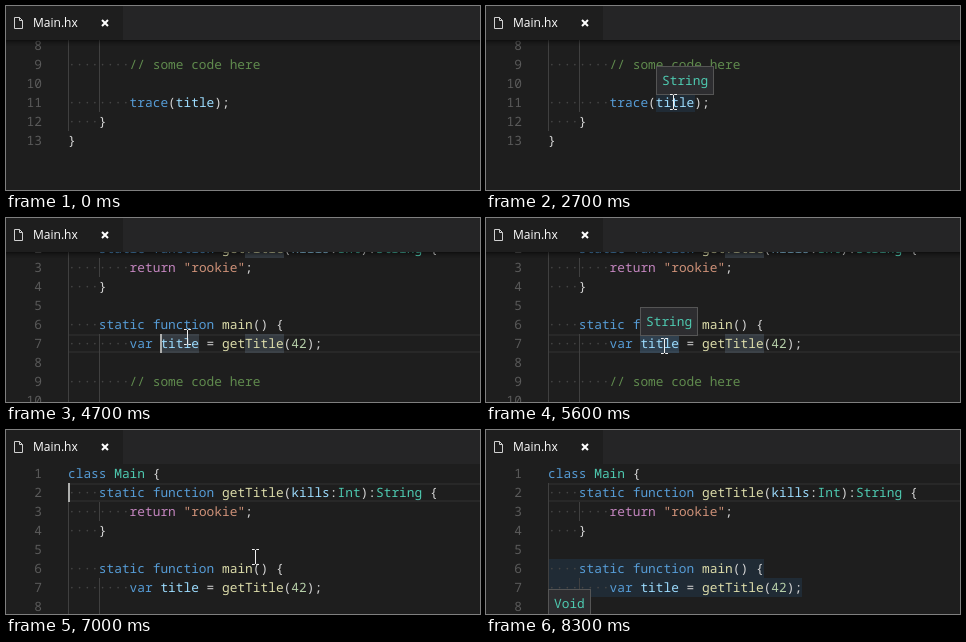
Recreate the animation shown at these times as an HTML page. Size 474 px wide and 184 px high, loop 8400 ms.

```html
<!DOCTYPE html>
<html lang="en">
<head>
<meta charset="utf-8">
<title>Hover and go to definition</title>
<style>
  html, body { margin: 0; width: 100%; height: 100%; overflow: hidden; background: #1e1e1e; }
  #stage { position: relative; width: 474px; height: 184px; overflow: hidden; background: #1e1e1e; }
  #stage div, #stage span, #stage svg { position: absolute; }
  #tabs { left: 0; top: 0; width: 474px; height: 34px; background: #252526; }
  #tab { left: 0; top: 0; width: 117px; height: 34px; background: #1e1e1e; }
  #tab span { left: 27px; top: 0; font: 12px/34px "Open Sans", "Noto Sans", sans-serif; color: #fff; }
  #editor { left: 0; top: 34px; width: 474px; height: 150px; overflow: hidden;
    font: 12.83px/19px "Noto Sans Mono", "DejaVu Sans Mono", monospace;
    text-rendering: geometricPrecision; white-space: pre; color: #d4d4d4; }
  #shadow { left: 0; top: 0; width: 474px; height: 6px; box-shadow: #000 0 6px 6px -6px inset; }
  #scroller, #marks, #lines { left: 0; top: 0; width: 474px; }
  .row { left: 62px; height: 19px; width: 412px; }
  .number { left: -42px; width: 16px; text-align: right; color: #5a5a5a; }
  .guide { width: 1px; height: 19px; background: #404040; }
  .space { color: #454545; }
  .comment { color: #608b4e; }
  .string { color: #ce9178; }
  .keyword { color: #569cd6; }
  .control { color: #c586c0; }
  .type { color: #4ec9b0; }
  .func { color: #dcdcaa; }
  .digits { color: #b5cea8; }
  .name { color: #9cdcfe; }
  .mark { height: 19px; }
  .hover { background: rgba(38, 79, 120, .25); }
  .match { background: rgba(173, 214, 255, .15); }
  #current { left: 62px; width: 412px; height: 19px; box-sizing: border-box; border: 2px solid #282828; border-width: 2px 0; }
  #caret { width: 2px; height: 19px; background: #aeafad; }
  #link { color: #4e94ce; text-decoration: underline; background: #1f2a35; }
  #tip { height: 27px; border: 1px solid #555; background: #2d2d30; }
  #tip .text { left: 5px; top: 4px; }
</style>
</head>
<body>
<div id="stage">
  <div id="tabs">
    <div id="tab">
      <svg width="117" height="34" fill="none" stroke="#d0d0d0">
        <path d="M8.5 11.5h5l3 3v8h-8zM13.5 11.5v3h3"/>
        <path d="M96 14l6 6m0-6l-6 6" stroke="#fff" stroke-width="2"/>
      </svg>
      <span>Main.hx</span>
    </div>
  </div>
  <div id="editor">
    <div id="scroller">
      <div id="current"></div>
      <div id="marks"></div>
      <div id="lines"></div>
      <div id="caret"></div>
    </div>
    <div id="shadow"></div>
    <div id="tip"></div>
  </div>
  <svg id="beam" width="9" height="18" fill="none" stroke="#f0f0f0">
    <path d="M1 1.5h2.5l1 1 1-1H8M1 16.5h2.5l1-1 1 1H8M4.5 2v14"/>
  </svg>
  <svg id="hand" width="18" height="24">
    <path d="M5.5 2a1.6 1.6 0 0 1 3.2 0V8l5.3 1q2 .5 2 2.5l-.7 6-1.3 5H6.5L5 18 1 13q-.5-2 1.5-2l3 2z" fill="#fff" stroke="#111"/>
    <path d="M8.7 8v4M11.2 8.6V12M13.6 9v3.4" stroke="#333" stroke-width=".8"/>
  </svg>
</div>
<script>
const LOOP = 8400, STEP = 100, CHAR = 7.7, ROW = 19, LEFT = 62;
const $ = id => document.getElementById(id);

const source = `class Main {
    static function getTitle(kills:Int):String {
        return "rookie";
    }

    static function main() {
        var title = getTitle(42);

        // some code here

        trace(title);
    }
}`.split('\n');
const depths = [0, 1, 2, 1, 1, 1, 2, 2, 2, 2, 2, 1, 0];

const syntax = new RegExp([
  '(?<space>^ +)', '(?<comment>//.*)', '(?<string>".*?")',
  '\\b(?<keyword>class|static|function|var|trace)\\b', '\\b(?<control>return)\\b',
  '\\b(?<type>Main|Int|String|Void)\\b', '\\b(?<func>[a-z]\\w*)(?=\\()',
  '(?<digits>\\d+)', '(?<name>\\w+)', '(?<plain>[^\\s\\w"]+)'
].join('|'), 'g');

// Every token sits on the character grid.
function tokens(text) {
  return [...text.matchAll(syntax)].map(m => {
    const kind = Object.keys(m.groups).find(k => m.groups[k]);
    const shown = kind === 'space' ? '·'.repeat(m[0].length) : m[0];
    return `<span class="${kind}" style="left:${m.index * CHAR}px">${shown}</span>`;
  }).join('');
}

$('lines').innerHTML = source.map((text, i) => {
  const guides = Array.from({ length: depths[i] }, (_, d) =>
    `<div class="guide" style="left:${Math.round(d * 4 * CHAR)}px"></div>`).join('');
  return `<div class="row" style="top:${i * ROW}px"><span class="number">${i + 1}</span>${guides}${tokens(text)}</div>`;
}).join('');

const xAt = col => Math.round(LEFT + col * CHAR);
const yAt = line => (line - 1) * ROW;
const mark = (kind, line, col, length) =>
  `<div class="mark ${kind}" style="left:${xAt(col)}px;top:${yAt(line)}px;width:${length * CHAR}px"></div>`;

// Pointer moves: start, number of steps, from, to.
const moves = [
  [1900, 5, [300, 196], [187, 96]],
  [4400, 6, [187, 96], [179, 127]],
  [5600, 1, [179, 127], [178, 128]],
  [5700, 2, [178, 128], [252, 126]],
  [5900, 1, [252, 126], [249, 127]],
  [7500, 6, [249, 127], [212, 200]]
];

function pointer(t) {
  const move = moves.filter(m => t >= m[0]).pop();
  if (!move) return [-50, -50];
  const [start, steps, from, to] = move;
  const p = Math.min(1, ((t - start) / STEP + 1) / steps);
  const eased = p * p * (3 - 2 * p);
  return from.map((v, i) => Math.round(v + (to[i] - v) * eased));
}

// Hovers: start, end, text, line and column, top inside the editor, highlighted ranges.
const hovers = [
  [2600, 3600, 'String', 14, 26, [[11, 14, 5]]],
  [5200, 5700, 'String', 12, 55, [[7, 12, 5]]],
  [6200, 6900, 'function(kills:Int):String', 20, 55, [[7, 20, 8]]],
  [8200, 8400, 'Void', 0, 125, [[6, 0, 28], [7, 0, 33], [8, 0, 1]]]
];
const matches = [[7, 12, 5], [7, 23, 5], [2, 23, 5]];

function caretOn(t) {
  if (t < 3700 || t >= 8200) return false;
  const since = t < 6900 ? t - 3700 : Math.max(0, t - 7000);
  return since % 1000 < 500;
}

const show = (id, on) => { $(id).style.display = on ? 'block' : 'none'; };
function place(id, x, y) {
  $(id).style.left = x + 'px';
  $(id).style.top = y + 'px';
}

function draw(t) {
  const scroll = t < 3600 ? 137 : t < 6900 ? 32 : 0;
  const hover = hovers.find(h => t >= h[0] && t < h[1]);
  const linked = t >= 6700 && t < 6900;
  const handy = t >= 6700 && t < 7000;

  place('scroller', 0, -scroll);
  show('shadow', scroll > 0);

  const [line, col] = t < 6900 ? [7, 12] : [2, 0];
  show('current', t >= 3600);
  place('current', LEFT, yAt(line));
  show('caret', caretOn(t));
  place('caret', xAt(col), yAt(line));

  let marks = '';
  if (t >= 3900 && t < 6900) marks += matches.map(m => mark('match', ...m)).join('');
  if (hover) marks += hover[5].map(m => mark('hover', ...m)).join('');
  $('marks').innerHTML = marks;

  const target = $('lines').children[6].querySelector('.func');
  target.style.color = linked ? '#4e94ce' : '';
  target.style.textDecoration = linked ? 'underline' : '';

  show('tip', hover);
  if (hover) {
    const [start, , text, column, top] = hover;
    $('tip').innerHTML = `<div class="text">${tokens(text)}</div>`;
    $('tip').style.width = text.length * CHAR + 10 + 'px';
    $('tip').style.opacity = t === start ? .5 : 1;
    place('tip', xAt(column), top);
  }

  const [x, y] = pointer(t);
  show('beam', !handy);
  show('hand', handy);
  place('beam', x - 4, y - 9);
  place('hand', x - 7, y);
}

let shown = -1;
function tick() {
  const t = Math.floor(performance.now() % LOOP / STEP) * STEP;
  if (t !== shown) draw(shown = t);
  requestAnimationFrame(tick);
}
tick();
</script>
</body>
</html>
```
